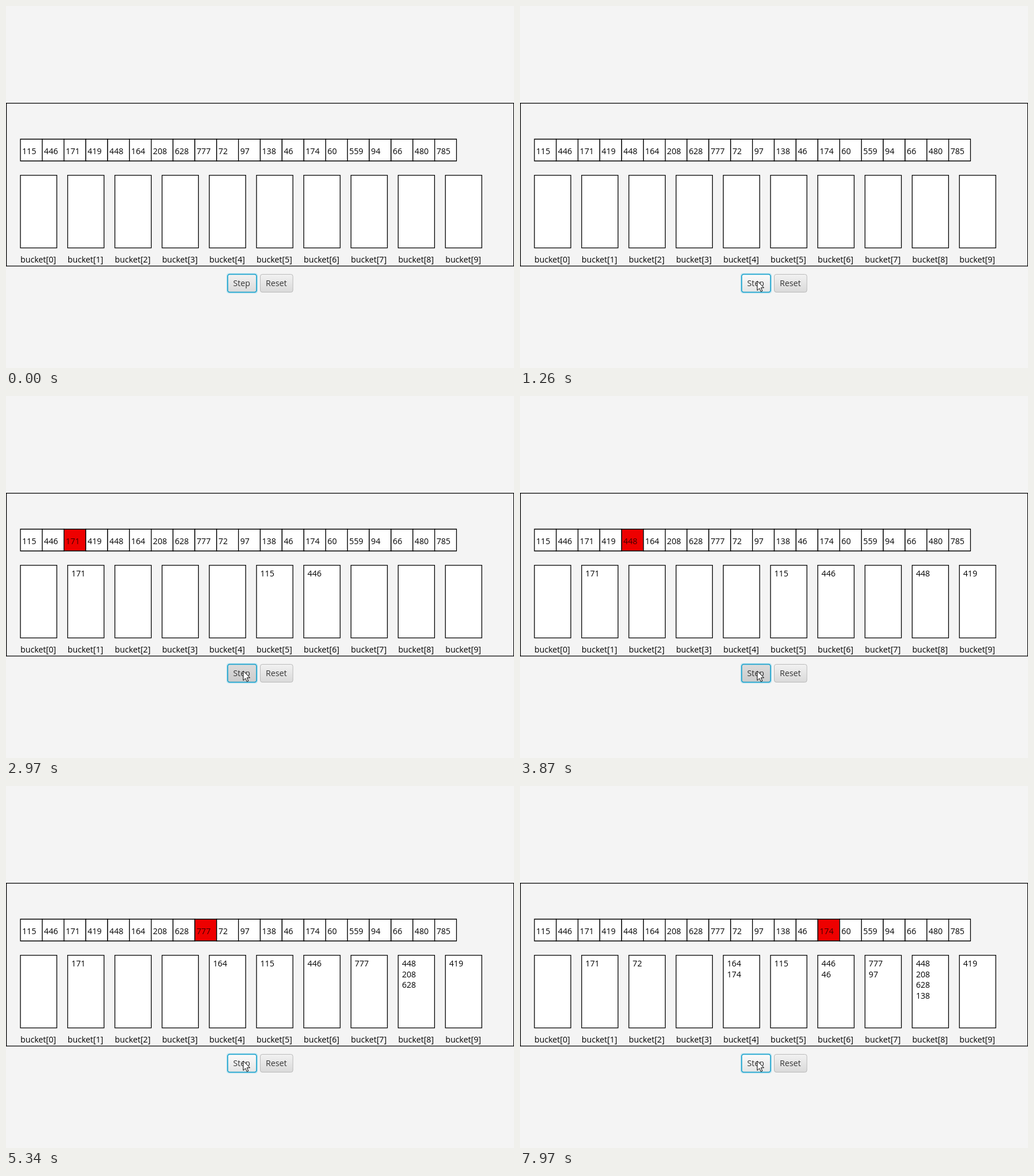
An HTML page with a canvas that plays this animation: 880x628 px, repeating every 8 s.

```html
<!DOCTYPE html>
<html lang="en">
<head>
<meta charset="utf-8">
<title>Radix sort buckets</title>
<style>
  html, body { margin: 0; width: 100%; height: 100%; overflow: hidden; background: #f4f4f4; }
  canvas { display: block; }
</style>
</head>
<body>
<canvas id="stage" width="880" height="628"></canvas>
<script>
const ctx = document.getElementById('stage').getContext('2d');
const LOOP = 8000;
const PRESS = 110;
const values = [115, 446, 171, 419, 448, 164, 208, 628, 777, 72,
                97, 138, 46, 174, 60, 559, 94, 66, 480, 785];
// Moments at which the Step button is released
const clicks = Array.from({ length: 14 }, (_, i) => 1690 + 452 * i);
// The pointer enters on the left and swings down onto the Step button
const pointer = { start: 300, duration: 816, from: [-12, 156], bend: [421, 169], to: [411, 477] };
const arrow = new Path2D('M0 0V16.4L3.8 12.8L6.3 18.4L8.8 17.3L6.4 11.8H11.5Z');
const shades = {
  normal: ['#f2f2f2', '#d9d9d9'],
  hover: ['#fbfbfb', '#e4e4e4'],
  pressed: ['#dcdcdc', '#cbcbcb'],
};

function box(x, y, w, h, fill) {
  ctx.beginPath();
  ctx.rect(x, y, w, h);
  if (fill) {
    ctx.fillStyle = fill;
    ctx.fill();
  }
  ctx.strokeStyle = '#000';
  ctx.lineWidth = 1.3;
  ctx.stroke();
}

function label(text, x, y, color = '#000') {
  ctx.fillStyle = color;
  ctx.fillText(text, x, y);
}

function drawArray(active) {
  values.forEach((value, i) => {
    const x = 25 + 37.77 * i;
    const on = i === active;
    box(x, 231, 37.77, 37.77, on ? '#ee0000' : '#fff');
    label(value, x + 3, 256.7, on ? '#400000' : '#000');
  });
}

function drawBuckets(count) {
  for (let digit = 0; digit < 10; digit++) {
    const x = 25 + 81.8 * digit;
    box(x, 293.6, 63, 126, '#fff');
    label(`bucket[${digit}]`, x, 444.6);
    values.slice(0, count)
      .filter(value => value % 10 === digit)
      .forEach((value, row) => label(value, x + 6.5, 313.2 + 18.6 * row));
  }
}

function drawButton(text, x, width, textX, [top, bottom], focused) {
  const shade = ctx.createLinearGradient(0, 465, 0, 497);
  shade.addColorStop(0, top);
  shade.addColorStop(1, bottom);
  const outline = inset => {
    ctx.beginPath();
    ctx.roundRect(x + inset, 465 + inset, width - 2 * inset, 32 - 2 * inset, 3.5);
  };
  if (focused) {
    outline(-0.8);
    ctx.strokeStyle = '#b4e0ee';
    ctx.lineWidth = 1.5;
    ctx.stroke();
  }
  outline(0.5);
  ctx.fillStyle = shade;
  ctx.fill();
  ctx.strokeStyle = focused ? '#129fcb' : '#bababa';
  ctx.lineWidth = focused ? 1.6 : 1;
  ctx.stroke();
  label(text, textX, 486.3, '#333');
}

function drawPointer(time) {
  if (time < pointer.start) return;
  const p = Math.min(1, (time - pointer.start) / pointer.duration);
  const s = 1 - (1 - p) ** 2;
  const [x, y] = [0, 1].map(axis =>
    (1 - s) ** 2 * pointer.from[axis] + 2 * s * (1 - s) * pointer.bend[axis] + s * s * pointer.to[axis]);
  ctx.save();
  ctx.translate(x, y);
  ctx.fillStyle = '#fff';
  ctx.fill(arrow);
  ctx.strokeStyle = '#000';
  ctx.lineWidth = 1;
  ctx.stroke(arrow);
  ctx.restore();
}

function stepShade(time) {
  if (clicks.some(t => time >= t - PRESS && time < t)) return shades.pressed;
  return time > 1000 ? shades.hover : shades.normal;
}

function draw(time) {
  const count = clicks.filter(t => t <= time).length;
  ctx.fillStyle = '#f4f4f4';
  ctx.fillRect(0, 0, 880, 628);
  ctx.font = '14.2px "Open Sans", "Noto Sans", sans-serif';
  box(0.6, 168.6, 879, 282.6);
  drawArray(count - 1);
  drawBuckets(count);
  drawButton('Step', 383.5, 51, 393.5, stepShade(time), true);
  drawButton('Reset', 440, 57.5, 450, shades.normal, false);
  drawPointer(time);
}

const start = performance.now();
function frame() {
  draw((performance.now() - start) % LOOP);
  requestAnimationFrame(frame);
}
frame();
</script>
</body>
</html>
```
